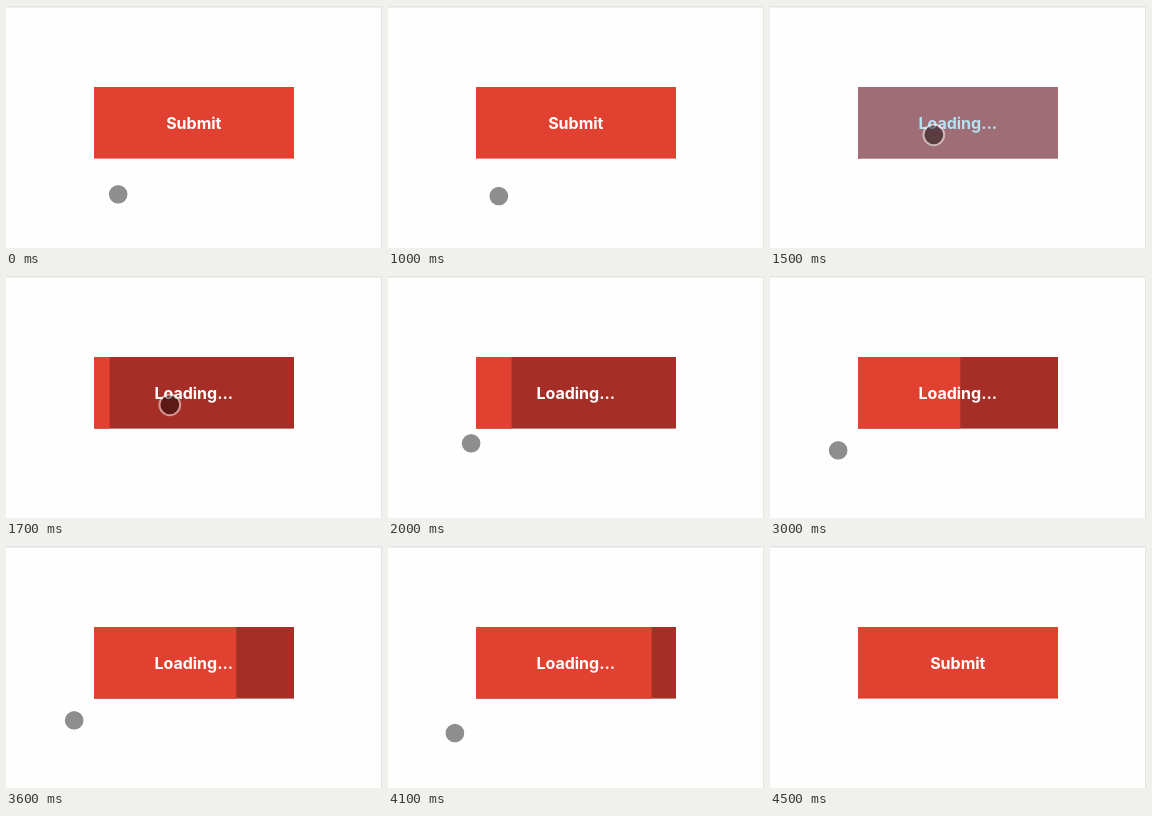
Write an HTML page that moves like this. It is 376 by 242 pixels and loops after 4.8 s.

```html
<!DOCTYPE html>
<html lang="en">
<head>
<meta charset="utf-8">
<title>Submit button with progress</title>
<style>
  html, body { margin: 0; width: 100%; height: 100%; overflow: hidden; background: #fefefe; }
  svg { display: block; width: 100%; height: 100%; }
  text { font: 700 16px Inter, "Liberation Sans", sans-serif; text-anchor: middle; fill: #fff; }
</style>
</head>
<body>
<svg viewBox="0 0 376 242">
  <rect width="376" height="242" fill="#fefefe"/>
  <rect width="376" height="1.5" fill="#e4e4e4"/>
  <rect x="375" width="1" height="242" fill="#e4e4e4"/>
  <rect id="base" x="88" y="81" width="200" height="71.6"/>
  <rect id="bar" x="88" y="81" height="71.6" fill="#e14131"/>
  <text id="label" x="187.8" y="122.8"></text>
  <rect id="tap" x="88" y="81" width="200" height="71.6" fill="#33b5e5" fill-opacity=".38"/>
  <g id="cursor">
    <circle r="9.4" fill="#000" fill-opacity=".44"/>
    <circle r="10.4" fill="none" stroke="#fff" stroke-opacity=".5" stroke-width="2"/>
  </g>
</svg>
<script>
const LOOP = 4800, STEP = 100;
const RED = '#e14131', DARK = '#a52f27';
const LOAD_START = 1465, LOAD_TIME = 3000, WIDTH = 200;

// Cursor stops: time, x, y
const path = [
  [200, 112.2, 188.3], [400, 110.8, 190.2],
  [1000, 110.8, 190.2], [1400, 163.8, 128.8],
  [1700, 163.8, 128.8], [2100, 68.2, 174.4],
  [4000, 68.2, 174.4], [4400, 60, 256]
];

const el = id => document.getElementById(id);
const [base, bar, label, tap, cursor] = ['base', 'bar', 'label', 'tap', 'cursor'].map(el);
const clamp = v => Math.min(1, Math.max(0, v));
const ease = v => v * v * (3 - 2 * v);

function cursorAt(t) {
  let [, x, y] = path[0];
  for (let i = 1; i < path.length; i++) {
    const [t0, x0, y0] = path[i - 1], [t1, x1, y1] = path[i];
    if (t < t0) break;
    const k = ease(clamp((t - t0) / (t1 - t0)));
    x = x0 + (x1 - x0) * k;
    y = y0 + (y1 - y0) * k;
  }
  return [x, y];
}

function draw(t) {
  const tapped = t >= 1500 && t < 1600;
  const loading = t >= 1500 && t < 4500;
  const progress = clamp((t - LOAD_START) / LOAD_TIME);
  base.setAttribute('fill', loading && !tapped ? DARK : RED);
  bar.setAttribute('width', loading ? progress * WIDTH : 0);
  label.textContent = loading ? 'Loading...' : 'Submit';
  tap.setAttribute('visibility', tapped ? 'visible' : 'hidden');
  cursor.setAttribute('transform', `translate(${cursorAt(t)})`);
}

const start = performance.now();
function tick() {
  const t = (performance.now() - start) % LOOP;
  draw(Math.floor(t / STEP) * STEP);
  requestAnimationFrame(tick);
}
tick();
</script>
</body>
</html>
```
